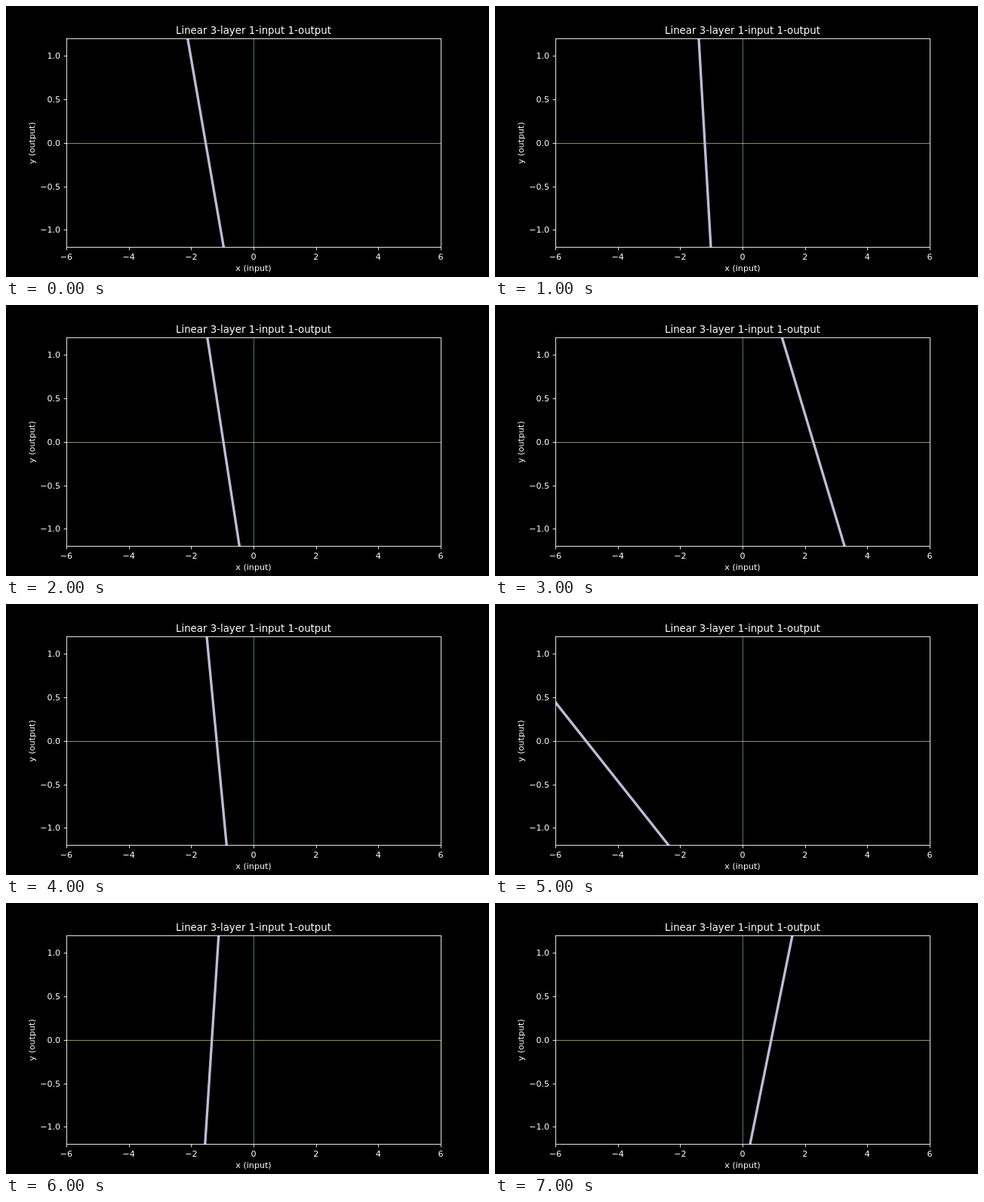
An HTML page that plays this animation: 640 by 360 pixels, repeating every 8 s.

```html
<!DOCTYPE html>
<html lang="en">
<head>
<meta charset="utf-8">
<style>
  html, body { margin: 0; width: 100%; height: 100%; overflow: hidden; background: #000; }
  svg { display: block; }
  text { font: 11.11px "DejaVu Sans", sans-serif; fill: #fff; text-anchor: middle; }
  text.title { font-size: 13.33px; }
  text.end { text-anchor: end; }
  .axis { stroke: #fff; stroke-width: .89; fill: none; }
  .zero { stroke-width: .56; }
</style>
</head>
<body>
<svg width="640" height="360" viewBox="0 0 640 360">
  <clipPath id="area"><rect x="80" y="43" width="496" height="278"/></clipPath>
  <path class="zero" stroke="#8dd3c7" d="M328.5 43V321"/>
  <path class="zero" stroke="#feffb3" d="M80 182.5H576"/>
  <g clip-path="url(#area)"><path id="curve" stroke="#bfbbd9" stroke-width="3.33"/></g>
  <rect class="axis" x="80.5" y="43.5" width="496" height="277"/>
  <g id="ticks"></g>
  <text class="title" x="328" y="37">Linear 3-layer 1-input 1-output</text>
  <text x="328" y="352">x (input)</text>
  <text transform="translate(38 182) rotate(-90)">y (output)</text>
</svg>
<script>
const TOP = 43.2, BOTTOM = 320.4, STEP = 1000;
// x position of the line at the top and bottom edge of the plot, per step
const poses = [
  [240.7, 288.4], [270, 286], [266.8, 309.3], [380.3, 463.2],
  [266, 292.3], [11, 230], [281.8, 263.8], [394, 338]
];

const minus = label => String(label).replace("-", "\u2212");
const tick = (d, x, y, label, cls = "") =>
  `<path class="axis" d="${d}"/><text class="${cls}" x="${x}" y="${y}">${minus(label)}</text>`;

let marks = "";
for (let v = -6; v <= 6; v += 2) {
  const x = 328 + v * 248 / 6;
  marks += tick(`M${Math.round(x) + .5} 320.5v3.9`, x, 336.5, v);
}
for (let v = -1; v <= 1; v += .5) {
  const y = Math.round(181.8 - v * 115.5);
  marks += tick(`M80.5 ${y + .5}h-3.9`, 72.2, y + 4, v.toFixed(1), "end");
}
document.getElementById("ticks").innerHTML = marks;

const curve = document.getElementById("curve");
function draw() {
  const [a, b] = poses[Math.floor(performance.now() / STEP) % poses.length];
  const dx = b - a, dy = BOTTOM - TOP;
  curve.setAttribute("d", `M${a - dx} ${TOP - dy}L${b + dx} ${BOTTOM + dy}`);
  requestAnimationFrame(draw);
}
draw();
</script>
</body>
</html>
```
